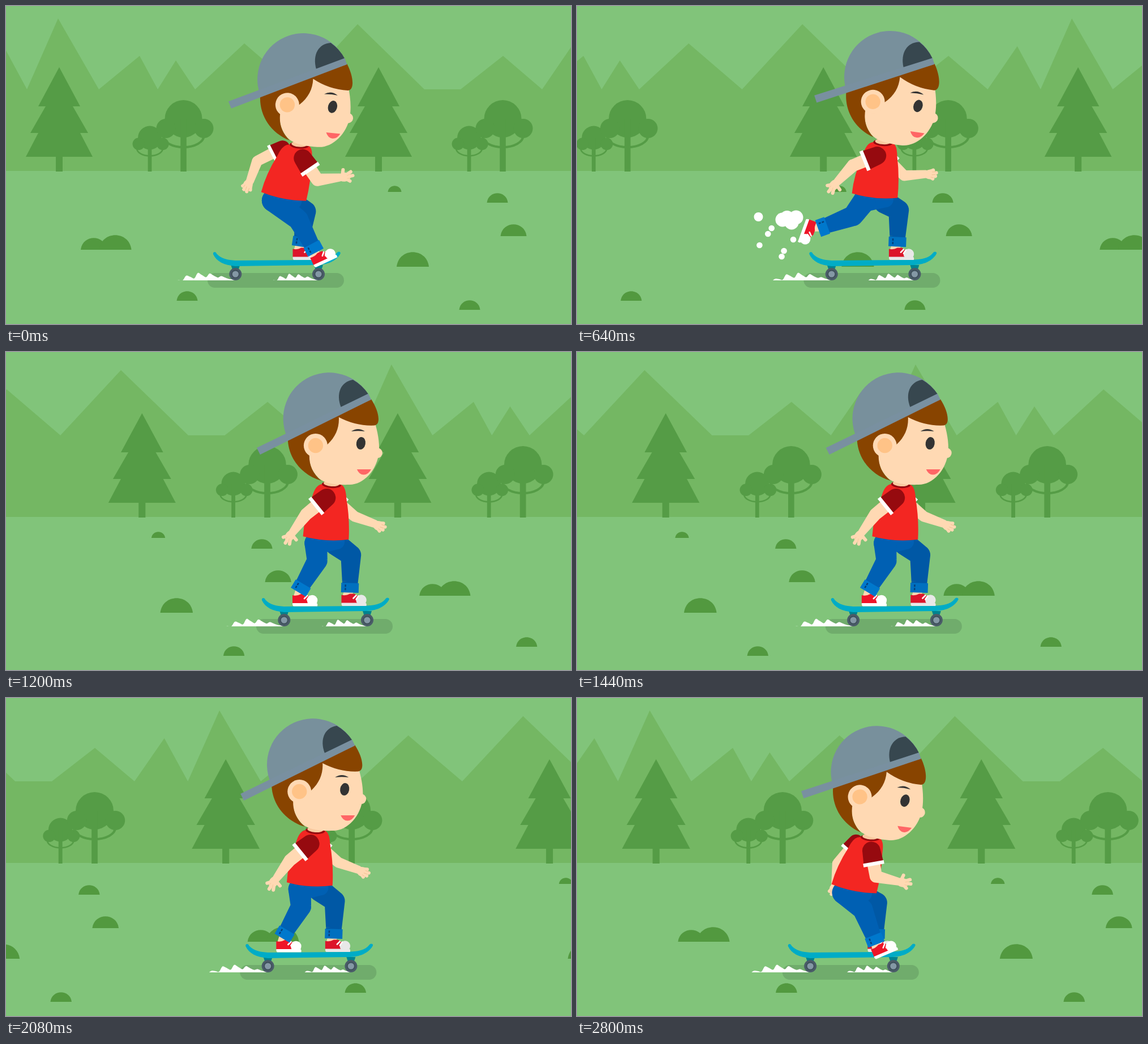
Write an HTML page that moves like this. It is 998 px wide and 561 px high and loops after 2880 ms.

```html
<!DOCTYPE html>
<html lang="en">
<head>
<meta charset="utf-8">
<title>Skateboard ride</title>
<style>
html, body { margin: 0; width: 100%; height: 100%; overflow: hidden; background: #81c47a; }
svg { display: block; width: 100vw; height: 100vh; }
</style>
</head>
<body>
<svg viewBox="0 0 998 561">
  <g id="land"></g>
  <g id="rider"></g>
</svg>
<script>
const LOOP = 2880, STEP = 80, RAD = Math.PI / 180;
const SKIN = '#ffd9b3', RED = '#f32622', DARK_RED = '#960a0f', TREE = '#559c46';
const NEAR = { pants: '#0060b3', cuff: '#0078cc', shoe: '#ee1528', toe: '#fff', bend: 12 };
const FAR = { pants: '#0058a5', cuff: '#0070bf', shoe: '#dc152a', toe: '#e8e8e8', bend: 19 };
const land = document.getElementById('land');
const rider = document.getElementById('rider');

// Smooth looping curve through rows of [time, value, value...]
function track(...rows) {
  const n = rows.length;
  const time = k => rows[(k + n) % n][0] + LOOP * Math.floor(k / n);
  const val = (k, c) => rows[(k + n) % n][c];
  const slope = (k, c) => (val(k + 1, c) - val(k, c)) / (time(k + 1) - time(k));
  const tangent = (k, c) => {
    const a = slope(k - 1, c), b = slope(k, c);
    return a * b <= 0 ? 0 : 2 * a * b / (a + b);
  };
  return t => {
    let i = n - 1;
    while (rows[i][0] > t) i--;
    const h = time(i + 1) - time(i), u = (t - time(i)) / h, v = 1 - u;
    return rows[0].slice(1).map((_, j) => {
      const c = j + 1;
      return v * v * (1 + 2 * u) * val(i, c) + u * u * (3 - 2 * u) * val(i + 1, c)
        + h * u * v * (v * tangent(i, c) - u * tangent(i + 1, c));
    });
  };
}

// Waist x, y, lean, head tilt, then upper and lower angle of the near and far arm
const stand = [479, 328, 6, 0, 141, 127, 41, 20];
const bodyAt = track(
  [0, 490.5, 336, 17, 5.5, 56, -6, 153, 110],
  [240, 491, 338, 19.6, 13.3, 43, -21, 161, 115],
  [640, 481.5, 334.5, 8.8, 8.3, 158, 134, 45, -4],
  [1120, ...stand], [2400, ...stand],
  [2800, 482.5, 336.5, 17.7, 7.7, 80, 13, 131, 96]);
// Kicking foot: x, y, angle
const footAt = track([0, 561, 443, -25], [240, 572, 434, -32], [440, 497, 476, 0],
  [640, 363, 399, 110], [1120, 442, 438, 0], [2400, 442, 438, 0], [2800, 536, 443, -23]);

// The push carries the board forward, then it slowly falls back
function ride(t) {
  if (t < 220) return 0;
  return t < 1200 ? 86 * (1 - (1 - (t - 220) / 980) ** 1.3) : 86 * (1 - ((t - 1200) / 1680) ** 1.7);
}

const mix = (a, b, u) => [a[0] + (b[0] - a[0]) * u, a[1] + (b[1] - a[1]) * u];
const turned = (p, x, y, deg) => {
  const c = Math.cos(deg * RAD), s = Math.sin(deg * RAD);
  return [p[0] + x * c - y * s, p[1] + x * s + y * c];
};
const angle = (a, b) => Math.atan2(b[1] - a[1], b[0] - a[0]) / RAD;
const num = v => v.toFixed(2);
const pt = p => num(p[0]) + ',' + num(p[1]);
const shape = (d, fill) => `<path d="${d}" fill="${fill}"/>`;
const line = (d, color, w) => `<path d="${d}" fill="none" stroke="${color}" stroke-width="${w}" stroke-linecap="round"/>`;
const dot = (x, y, r, fill) => `<circle cx="${num(x)}" cy="${num(y)}" r="${num(r)}" fill="${fill}"/>`;
const oval = (x, y, rx, ry, fill, turn = 0) =>
  `<ellipse cx="${x}" cy="${y}" rx="${rx}" ry="${ry}" fill="${fill}" transform="rotate(${turn} ${x} ${y})"/>`;
const place = (p, turn, body, k = 1) =>
  `<g transform="translate(${pt(p)}) rotate(${num(turn)}) scale(${k})">${body}</g>`;

// Tapered limb with round joints
function limb(points, radii, fill) {
  let d = '';
  points.forEach((p, i) => {
    const r = radii[i], q = points[i + 1];
    d += `M${num(p[0] - r)},${num(p[1])}a${r},${r} 0 1 0 ${2 * r},0a${r},${r} 0 1 0 ${-2 * r},0Z`;
    if (!q) return;
    const a = angle(p, q), s = radii[i + 1];
    d += `M${pt(turned(p, 0, r, a))}L${pt(turned(q, 0, s, a))} ${pt(turned(q, 0, -s, a))} ${pt(turned(p, 0, -r, a))}Z`;
  });
  return shape(d, fill);
}

function roundTree(x, y, k) {
  return dot(x, y, 33 * k, TREE) + dot(x - 31 * k, y + 17 * k, 17 * k, TREE) + dot(x + 36 * k, y + 17 * k, 17 * k, TREE)
    + line(`M${x - 36 * k},${y + 30 * k}A${36 * k},${20 * k} 0 0 0 ${x + 36 * k},${y + 30 * k}`, TREE, 4 * k)
    + shape(`M${x - 5.3 * k},${y}h${10.6 * k}V292h${-10.6 * k}Z`, TREE);
}

const pine = x => shape(`M${x},108l37,69h-13l27,47h-14l22,42h-53v26h-12v-26h-53l22,-42h-14l27,-47h-13Z`, TREE);
const mound = (x, y, w) =>
  shape(`M${x - w},${y}C${x - w * .86},${y - w * 1.2} ${x + w * .86},${y - w * 1.2} ${x + w},${y}Z`, '#52993f');

function buildLand() {
  // Valley x, then the peak that follows it
  const ridge = [[37, 92, 22], [164, 236, 88], [268, 300, 96], [334, 421, 66], [515, 621, 32],
    [739, 771, 147], [803, 878, 88], [947, 999, 71]];
  const mounds = [[686.5, 328, 12], [868, 347, 18.5], [896.5, 406, 23], [718.5, 460, 28.5],
    [819, 536, 18.5], [320, 520, 18.5], [155, 430, 23], [193, 430, 28.5]];
  let tile = mounds.map(m => mound(...m)).join('');
  for (const x of [94, 658]) tile += pine(x) + roundTree(x + 160, 232.5, .635) + roundTree(x + 219.5, 199, 1);
  let hills = 'M-966,291', plants = '';
  for (const k of [-1, 0, 1]) {
    for (const [low, x, y] of ridge) hills += `L${low + k * 1003},147L${x + k * 1003},${y}`;
    plants += `<g transform="translate(${k * 1012})">${tile}</g>`;
  }
  land.innerHTML = shape(hills + 'V291Z', '#74b763') + plants;
}

// Humps of foam that drift back and shrink behind a wheel
function spray(t) {
  const shift = 21 * (t % 240) / 240;
  let d = 'M297,484';
  for (let x = 297; x <= 405; x += 1.5) {
    const u = (x - 296) / 109, swing = .15 + .3 * (1 - u);
    const phase = 2 * Math.PI * (x - 299 + shift) / 21;
    const wave = 1 - swing + swing * Math.cos(phase + .5 * Math.cos(phase));
    const h = 13.5 * Math.sin(Math.PI * u ** .85) * wave - 3 * Math.max(0, 1 - u * 2.5);
    d += `L${x},${num(484 - Math.max(0, h))}`;
  }
  const foam = shape(d + 'V484Z', '#fff');
  return foam + `<g transform="translate(552 484) scale(.79 .88) translate(-405 -484)">${foam}</g>`;
}

// A cloud and loose puffs fly off the ground where the foot kicks
function dust(t) {
  if (t < 500 || t > 960) return '';
  const u = (t - 480) / 160, go = u < 1 ? 1 - (1 - u) ** 2 : 1 + .1 * (u - 1);
  const size = u < 1 ? .5 + .5 * u : Math.max(0, 1 - (u - 1) / 2);
  let out = '';
  for (let i = 0; i < 12; i++) {
    const cloud = i < 4, a = i * 2.4;
    const goal = cloud ? [363 + 8 * i, 377 - 5 * Math.sin(a)] : [352 + 32 * Math.cos(a), 332 + 10 * i];
    const p = mix([430, 478], goal, go);
    out += dot(p[0], p[1], size * (cloud ? 12.5 : i < 6 ? 8 : 5.3), '#fff');
  }
  return out;
}

const wheel = x => shape(`M${x - 8},457h16l-3,9h-10Z`, '#00838f')
  + dot(x, 473, 11, '#4a5c68') + dot(x, 473, 7.6, '#3f505b') + dot(x, 473, 5.6, '#8498a5');

const board = wheel(405.3) + wheel(552)
  + shape('M366,438C365,433 371,433 372,437C380,446 392,448 405,449L545,448C565,447 577,445 584,436C587,431 593,434 590,438C581,453 562,457 548,457L405,459C385,457 372,451 366,438Z', '#00acc6');

const head = shape('M540,150L588,108 650,118C657,140 660,158 659,175C656,207 632,233 607,233C580,234 562,230 553,222C538,208 533,190 536,170Z', SKIN)
  + dot(656, 177, 9, SKIN)
  + shape('M498,155C500,187 522,216 557,226C541,213 535,197 536,178L568,162C583,148 589,132 588,114Q618,130 651,128.500C663,127 659,103 645,82Z', '#884400')
  + shape('M497,150A81,81 0 1 1 645,83Z', '#78909c')
  + shape('M592,97C582,72 592,51 613,48A81,81 0 0 1 640,73Z', '#37474f')
  + shape('M443,168L640,72.500 645,83 449,180Z', '#7990a0')
  + dot(547, 164, 21, SKIN) + dot(547, 164, 13.2, '#ffc387')
  + oval(627, 160, 8, 11, '#333', 10)
  + shape('M610,139Q622,131 634,139Q622,137.500 610,139Z', '#333')
  + shape('M620,206H645Q640,215.500 632,215.500T620,206Z', '#ff6666');

const shoe = c => shape('M-22,-9Q-14,-7 -7,-11H1L12,-4V6H-22Z', c.shoe)
  + dot(13, 0, 9.3, c.toe) + shape('M-22,5H20Q23,5 22,10.500H-20Q-22,10 -22,5Z', c.toe)
  + line('M-1,-3L4,-8M4,-1L8,-7', '#fff', 2.6);

// The knee follows from hip and foot: higher up and bent when the leg is short
function leg(hip, foot, turn, c) {
  const ankle = turned(foot, -7 - .1 * Math.abs(turn), -22, turn);
  const reach = Math.hypot(ankle[0] - hip[0], ankle[1] - hip[1]);
  const knee = turned(hip, reach * (reach / 180 - .12), -c.bend, angle(hip, ankle));
  const cuff = `<rect x="-8" y="-15.500" width="17" height="31" fill="${c.cuff}"/>`
    + '<path d="M-5,8H6" stroke="#06407c" stroke-width="2.500" stroke-dasharray="4 2"/>';
  return limb([ankle, turned(foot, -12, -6, turn)], [8, 8], SKIN) + place(foot, turn, shoe(c))
    + limb([hip, knee, mix(knee, ankle, .82)], [20, 18, 14], c.pants)
    + place(ankle, angle(knee, ankle), cuff);
}

const sleeve = shape('M0,-16A16,16 0 0 0 0,16L21,17.500V-17.500Z', DARK_RED)
  + '<rect x="20" y="-18.500" width="6.500" height="37" fill="#fff"/>';
const openHand = oval(8, 0, 11, 8, SKIN)
  + line('M5,-4L7,-13M11,-3L20,-8M12,0L23,-1M10,3L17,8', SKIN, 6)
  + line('M13,-2L18,-4M13,3L18,3', '#f3c799', .8);
const fist = oval(8, 1, 11, 8.5, SKIN)
  + line('M8,-4L14,-6M12,0L19,-1M12,3L17,5M8,6L12,9', SKIN, 6)
  + line('M12,-3L18,-3M11,2L17,2M9,6L13,7', '#eebd8e', .8);

function arm(shoulder, up, low, upLen, lowLen, hand, k) {
  const elbow = turned(shoulder, upLen, 0, up), wrist = turned(elbow, lowLen, 0, low);
  return limb([shoulder, elbow, wrist], [12 * k, 11 * k, 7], SKIN)
    + place(wrist, low, hand) + place(shoulder, up, sleeve, k);
}

function torso(waist, neck, lean) {
  const top = (lean - 6) * .6, base = lean * .64;
  const tl = turned(neck, -29, 0, top), tr = turned(neck, 25, 0, top);
  const bl = turned(waist, -40.5, 0, base), br = turned(waist, 40.5, 0, base);
  const left = mix(tl, bl, .25), right = mix(tr, br, .25);
  const bulge = (a, b, x, y) => pt(turned(mix(a, b, .5), x, y, 0));
  return shape(`M${pt(turned(neck, -16, -1, 0))}Q${pt(tl)} ${pt(left)}Q${bulge(left, bl, -6, 0)} ${pt(bl)}`
    + `Q${bulge(bl, br, 0, 8)} ${pt(br)}Q${bulge(right, br, 4, 0)} ${pt(right)}Q${pt(tr)} ${pt(turned(neck, 15, 0, 0))}Z`, RED)
    + place(neck, 4, oval(0, 0, 17, 6, DARK_RED) + oval(0, -2, 14, 5, '#f8caa0'));
}

function person(t) {
  const [wx, wy, lean, tilt, up, low, farUp, farLow] = bodyAt(t);
  const [fx, fy, turn] = footAt(t);
  const waist = [wx, wy], neck = turned(waist, 0, -94.5, lean);
  const hip = turned(waist, -17, 10.5, lean * .64), farHip = turned(waist, 19, 10, lean * .64);
  const swing = Math.cos(up * RAD), farSwing = Math.cos(farUp * RAD);
  const shoulder = turned(neck, 11 * swing, 23, 0);
  const farShoulder = turned(neck, 20 * farSwing - 12, 15 + 11 * farSwing, 0);
  return arm(farShoulder, farUp, farLow, 50, 38, fist, .85)
    + leg(farHip, [528.5, 437.5], 0, FAR)
    + limb([hip, turned(farHip, 1, -5, 0)], [20, 14], NEAR.pants)
    + leg(hip, [fx, fy], turn, NEAR)
    + torso(waist, neck, lean)
    + arm(shoulder, up, low, 46, 40, openHand, 1)
    + place(neck, tilt, `<g transform="translate(-575 -233)">${head}</g>`);
}

function draw(t) {
  land.setAttribute('transform', `matrix(${1 + .0187 * t / 2800} 0 0 1 ${-.3525 * t} 0)`);
  rider.innerHTML = dust(t) + place([ride(t), 0], 0,
    '<rect x="356" y="471" width="241" height="26" rx="13" fill="#70ac6c"/>' + spray(t) + board + person(t));
}

buildLand();
const start = performance.now();
let last = -1;
function tick(now) {
  const t = Math.floor((Math.max(0, now - start) % LOOP) / STEP) * STEP;
  if (t !== last) draw(last = t);
  requestAnimationFrame(tick);
}
tick(start);
</script>
</body>
</html>
```
